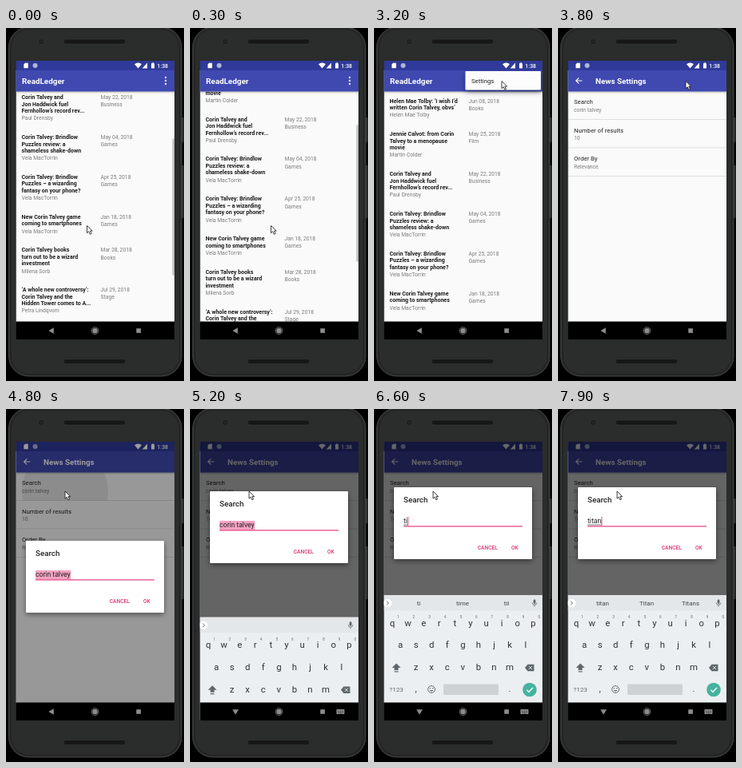
Write an HTML page that moves like this. It is 223 by 442 pixels and loops after 8000 ms.

```html
<!DOCTYPE html>
<html lang="en">
<head>
<meta charset="utf-8">
<title>News reader settings</title>
<style>
  html, body { margin: 0; width: 100%; height: 100%; overflow: hidden; background: #000; }
  svg { display: block; width: 100vw; height: 100vh; font-family: Roboto, "Open Sans", sans-serif; }
</style>
</head>
<body>
<svg id="stage" viewBox="0 0 223 442" xmlns="http://www.w3.org/2000/svg"></svg>
<script>
const LOOP = 8000, STEP = 100;
const INDIGO = '#3f49b0', INDIGO_DARK = '#303a9a', ACCENT = '#e02d74', INK = '#222', GREY = '#7b7b7b';

const articles = [
  ['Helen Mae Tolby: ‘I wish I’d|written Corin Talvey, obvs’', 'Carrie Ann Dunlo', 'Jun 08, 2018', 'Books'],
  ['Jennie Calvot: from Corin|Talvey to a menopause|movie', 'Martin Colder', 'May 25, 2018', 'Film'],
  ['Corin Talvey and|Jon Haddwick fuel|Fernhollow’s record rev...', 'Paul Drensby', 'May 22, 2018', 'Business'],
  ['Corin Talvey: Brindlow|Puzzles review: a|shameless shake-down', 'Vela MacTorrin', 'May 04, 2018', 'Games'],
  ['Corin Talvey: Brindlow|Puzzles – a wizarding|fantasy on your phone?', 'Vela MacTorrin', 'Apr 25, 2018', 'Games'],
  ['New Corin Talvey game|coming to smartphones', 'Vela MacTorrin', 'Jan 18, 2018', 'Games'],
  ['Corin Talvey books|turn out to be a wizard|investment', 'Milena Sorb', 'Mar 28, 2018', 'Books'],
  ['‘A whole new controversy’:|Corin Talvey and the|Hidden Tower comes to A...', 'Petra Lindqvorn', 'Jul 29, 2018', 'Stage']
];
articles[0][1] = 'Helen Mae Tolby';

const text = (x, y, s, size, fill = INK, extra = '') =>
  `<text x="${x}" y="${y}" font-size="${size}" fill="${fill}" ${extra}>${s}</text>`;
const rect = (x, y, w, h, fill, extra = '') =>
  `<rect x="${x}" y="${y}" width="${w}" height="${h}" fill="${fill}" ${extra}/>`;
const circle = (x, y, r, fill, extra = '') =>
  `<circle cx="${x}" cy="${y}" r="${r}" fill="${fill}" ${extra}/>`;
const path = (d, fill, extra = '') => `<path d="${d}" fill="${fill}" ${extra}/>`;
const group = (id, body, extra = '') => `<g id="${id}" ${extra}>${body}</g>`;
const BOLD = 'font-weight="700"', MEDIUM = 'font-weight="500"', MID = 'text-anchor="middle"';

function articleList() {
  let y = 93.7, out = '';
  for (const [title, author, date, section] of articles) {
    const lines = title.split('|');
    lines.forEach((line, i) => out += text(19.5, y + i * 8.5, line, 7.05, '#1c1c1c', BOLD));
    out += text(19.5, y + lines.length * 8.5 + .7, author, 6.75, GREY)
      + text(118.5, y, date, 6.75, GREY) + text(118.5, y + 9.2, section, 6.75, GREY);
    y += lines.length * 8.4 + 24.7;
  }
  return out;
}

const toolbar = title => rect(12.5, 53, 198.5, 26.5, INDIGO, 'filter="url(#soft)"') + title;

function settingsPage() {
  const rows = [['Search', 'corin talvey'], ['Number of results', '10'], ['Order By', 'Relevance']];
  const body = rows.map(([name, value], i) => {
    const y = 95.2 + i * 35.4;
    return text(20, y, name, 7.75) + text(20, y + 9.5, value, 6.75, GREY)
      + rect(12.5, y + 19, 198.5, .7, '#d4d4d4');
  }).join('');
  const arrow = path('M30.2 66H22.6M26.2 62.3L22.5 66L26.2 69.7', 'none', 'stroke="#fff" stroke-width="1.1"');
  return rect(12.5, 53, 198.5, 315, '#fafafa') + body
    + circle(74, 103, 0, '#000', 'id="ripple" clip-path="url(#rowClip)"')
    + toolbar(arrow + text(47, 69.5, 'News Settings', 9.8, '#fff', BOLD));
}

function dialogBox() {
  return rect(25, 165, 173, 90, '#fff', 'rx="1" filter="url(#deep)"')
    + text(37, 184.3, 'Search', 9.8, INK, MEDIUM)
    + rect(37, 202, 45, 11.5, '#f3a3c2', 'id="selection"')
    + text(37, 210.4, '', 8.65, INK, 'id="field"')
    + rect(37, 211.7, 0, .6, INK, 'id="composing"')
    + rect(0, 202, .9, 11, ACCENT, 'id="caret"')
    + rect(37, 213.4, 149, 1.1, ACCENT)
    + text(129.8, 243, 'CANCEL', 6.6, ACCENT, MEDIUM) + text(172, 243, 'OK', 6.6, ACCENT, MEDIUM);
}

function keyboard() {
  const KEY = '#2f3437', ICON = '#5f686d';
  const row = (letters, x, y) => [...letters].map((c, i) =>
    text(x + i * 19.6, y, c, 11.4, KEY, MID)).join('');
  const hints = [...'1234567890'].map((c, i) => text(30.3 + i * 19.6, 262, c, 4.6, ICON, MID)).join('');
  const strip = [56, 111, 166].map((x, i) => text(x, 246, '', 8, '#40474b', `${MID} id="word${i}"`)).join('');
  const smiley = circle(72, 351, 4.4, 'none', `stroke="${ICON}"`) + circle(70.4, 349.8, .7, ICON)
    + circle(73.6, 349.8, .7, ICON) + path('M69.6 352Q72 355.2 74.4 352Z', ICON);
  return rect(12.5, 233, 198.5, 135, '#eceff1') + rect(12.5, 233, 198.5, 19.5, '#e4e7e9')
    + circle(17, 243, 5.2, '#fff') + path('M16 240.7L18.3 243L16 245.3', 'none', `stroke="${ICON}"`)
    + strip
    + rect(199.7, 238.5, 2.8, 5.4, ICON, 'rx="1.4"')
    + path('M198.2 242.5Q198.5 245.4 201.1 245.4T204 242.5M201.1 245.4V247.6', 'none', `stroke="${ICON}" stroke-width=".8"`)
    + row('qwertyuiop', 23, 271.5) + hints + row('asdfghjkl', 33, 299) + row('zxcvbnm', 52.5, 327.3)
    + path('M28 318.5L33.5 324H30.5V327H25.5V324H22.5ZM25.5 328.2H30.5V329.4H25.5Z', ICON)
    + path('M189 324L192.5 319.7H200.5V328.3H192.5Z', ICON)
    + path('M194 322L198 326M198 322L194 326', 'none', 'stroke="#eceff1" stroke-width=".9"')
    + text(28, 354.2, '?123', 8, ICON, MID) + text(52.5, 354, ',', 11, KEY, MID) + smiley
    + rect(87, 344.5, 69, 13.5, '#ced2d5', 'rx="1"') + text(170, 354, '.', 11, KEY, MID)
    + circle(195, 351.5, 8.8, '#45b3a0')
    + path('M191.3 351.7L194 354.3L199 349', 'none', 'stroke="#fff" stroke-width="1.3"');
}

const statusBar = () => rect(12.5, 41, 198.5, 12, INDIGO_DARK)
  + path('M23.9 43.8H27.7V50.3H22.3V45.4Z', '#fff')
  + circle(36.5, 47, 3, '#aeb6dc') 
  + path('M161 45.2Q165.5 41.8 170 45.2L165.5 50.5Z', '#fff')
  + path('M177 43.5V50.5H170.7Z', '#fff')
  + path('M182 44.3H183V43.5H185V44.3H186V50.5H182Z', '#fff')
  + text(189.3, 49.6, '1:38', 7, '#fff', MEDIUM);

const phone = () => rect(0, 0, 223, 442, '#000')
  + rect(219, 112, 3.6, 31, '#303030', 'rx="1"') + rect(219, 172, 3.6, 66, '#303030', 'rx="1"')
  + rect(3.5, -1, 216.5, 437, '#292a2a', 'rx="25" stroke="#464646" stroke-width="1"')
  + rect(6, 1.5, 211.5, 432, '#2b2c2c', 'rx="23" stroke="#202020" stroke-width="1"')
  + [17, 417.5].map(y => rect(72, y - 3, 78, 6, '#171717', 'rx="3" stroke="#383838" stroke-width=".6"')).join('')
  + circle(44, 17, 3.2, '#191919', 'stroke="#393939" stroke-width=".7"') + circle(44, 17, 1.2, '#30343a');

const navBar = () => {
  const ICON = '#8d8d8d';
  return rect(12.5, 367.5, 198.5, 22.5, '#000')
    + path('M53.3 379L59.8 375.2V382.8Z', ICON, 'id="back"')
    + circle(111.5, 379, 3.2, ICON) + circle(111.5, 379, 4.4, 'none', `stroke="${ICON}" stroke-width=".8"`)
    + rect(163.3, 376.2, 5.6, 5.6, ICON)
    + group('imeIcon', rect(183.5, 376, 10, 6, ICON, 'rx=".8"')
      + path('M185 378H192M185 379.6H192M186.5 381H190.5', 'none', 'stroke="#111" stroke-width=".6" stroke-dasharray="1 .5"'));
};

const shadow = (id, dy, blur, alpha) =>
  `<filter id="${id}" x="-20%" y="-40%" width="140%" height="200%"><feDropShadow dx="0" dy="${dy}" stdDeviation="${blur}" flood-opacity="${alpha}"/></filter>`;
const clip = (id, x, y, w, h) => `<clipPath id="${id}">${rect(x, y, w, h, '#000')}</clipPath>`;

const dots = [62, 66, 70].map(y => circle(200, y, 1.15, '#fff')).join('');
document.getElementById('stage').innerHTML =
  `<defs>${shadow('soft', .8, .9, .35)}${shadow('deep', 2.5, 3, .45)}
   ${clip('screen', 12.5, 41, 198.5, 349)}${clip('page', 12.5, 53, 198.5, 315)}${clip('rowClip', 12.5, 79.5, 198.5, 35)}</defs>`
  + phone()
  + `<g clip-path="url(#screen)">`
  + `<g clip-path="url(#page)">` + rect(12.5, 53, 198.5, 315, '#fafafa') + group('list', articleList())
  + rect(208.6, 79, 2, 171, '#808080', 'id="thumb"')
  + toolbar(text(20, 69.5, 'ReadLedger', 9.9, '#fff', BOLD) + dots) + '</g>'
  + group('menu', rect(114.5, 54, 94.5, 23.5, '#fcfcfc', 'rx=".8" filter="url(#deep)"')
    + rect(114.5, 54, 94.5, 23.5, '#000', 'id="menuPress"') + text(122, 68.6, 'Settings', 7.75))
  + group('settings', settingsPage(), 'clip-path="url(#page)"')
  + statusBar()
  + rect(12.5, 41, 198.5, 327, '#000', 'id="dim"')
  + group('dialog', dialogBox()) + group('keys', keyboard()) + navBar() + '</g>'
  + path('M0 0V9.2L2.2 7.2L3.8 10.8L5.5 10L3.9 6.6H6.7Z', '#fff', 'id="pointer" stroke="#111" stroke-width=".8"');

const el = {};
document.querySelectorAll('[id]').forEach(n => el[n.id] = n);
const set = (id, attrs) => { for (const k in attrs) el[id].setAttribute(k, attrs[k]); };
const shift = (id, x, y) => set(id, { transform: `translate(${x} ${y})` });
const ramp = (t, a, b) => Math.min(1, Math.max(0, (t - a) / (b - a)));
const ease = (t, a, b) => { const p = ramp(t, a, b); return p * p * (3 - 2 * p); };

const pointerMoves = [[950, 1400, 203, 72], [2600, 3100, 160, 66.5], [3950, 4450, 74, 103]];
const keyTimes = [6000, 6400, 6800, 7100, 7500];
const suggestions = ['||', 't|the|to', 'ti|time|til', 'tit|title|titans', 'tita|titan|Titan', 'titan|Titan|Titans'];

function pointerAt(t) {
  let x = 101.5, y = 247.5;
  for (const [a, b, toX, toY] of pointerMoves) {
    const p = ease(t, a, b);
    x += (toX - x) * p;
    y += (toY - y) * p;
  }
  return [x, y];
}

function drawField(t) {
  const typed = keyTimes.filter(k => t >= k).length;
  el.field.textContent = typed ? 'titan'.slice(0, typed) : 'corin talvey';
  const width = el.field.getComputedTextLength();
  set('selection', { opacity: typed ? 0 : 1, width: width + .6 });
  set('composing', { width: typed ? width : 0 });
  const blink = typed && (t - keyTimes[typed - 1]) % 1000 < 500;
  set('caret', { x: 37.2 + width, opacity: blink ? 1 : 0 });
  suggestions[typed].split('|').forEach((w, i) => el['word' + i].textContent = w);
}

function draw(t) {
  const scroll = 96 * (1 - ease(t, 0, 850));
  shift('list', 0, -scroll);
  shift('thumb', 0, scroll * .62);
  set('thumb', { opacity: .55 * (1 - ramp(t, 900, 1200)) });

  const open = ease(t, 2050, 2300);
  set('menu', {
    opacity: open * (1 - ramp(t, 3600, 3750)),
    transform: `translate(209 54) scale(${.6 + .4 * open}) translate(-209 -54)`
  });
  set('menuPress', { opacity: .1 * ramp(t, 3350, 3600) });

  const enter = ease(t, 3600, 3800);
  set('settings', { opacity: enter });
  shift('settings', 0, 20 * (1 - enter));
  set('ripple', { r: 54 * ramp(t, 4450, 4800), opacity: .08 * (1 - ramp(t, 4800, 5100)) });

  set('dim', { opacity: .6 * ramp(t, 4650, 4880) });
  set('dialog', { opacity: ramp(t, 4620, 4780) });
  shift('dialog', 0, -67 * ease(t, 4950, 5250));
  const up = ease(t, 4950, 5300);
  shift('keys', 0, 140 * (1 - up));
  set('keys', { opacity: up > 0 ? 1 : 0 });
  set('imeIcon', { opacity: up > 0 ? 1 : 0 });
  set('back', { transform: `rotate(${up > 0 ? -90 : 0} 57 379)` });
  drawField(t);
  shift('pointer', ...pointerAt(t));
}

const start = performance.now();
function tick(now) {
  const t = Math.max(0, now - start) % LOOP;
  draw(Math.floor(t / STEP) * STEP);
  requestAnimationFrame(tick);
}
draw(0);
requestAnimationFrame(tick);
</script>
</body>
</html>
```
